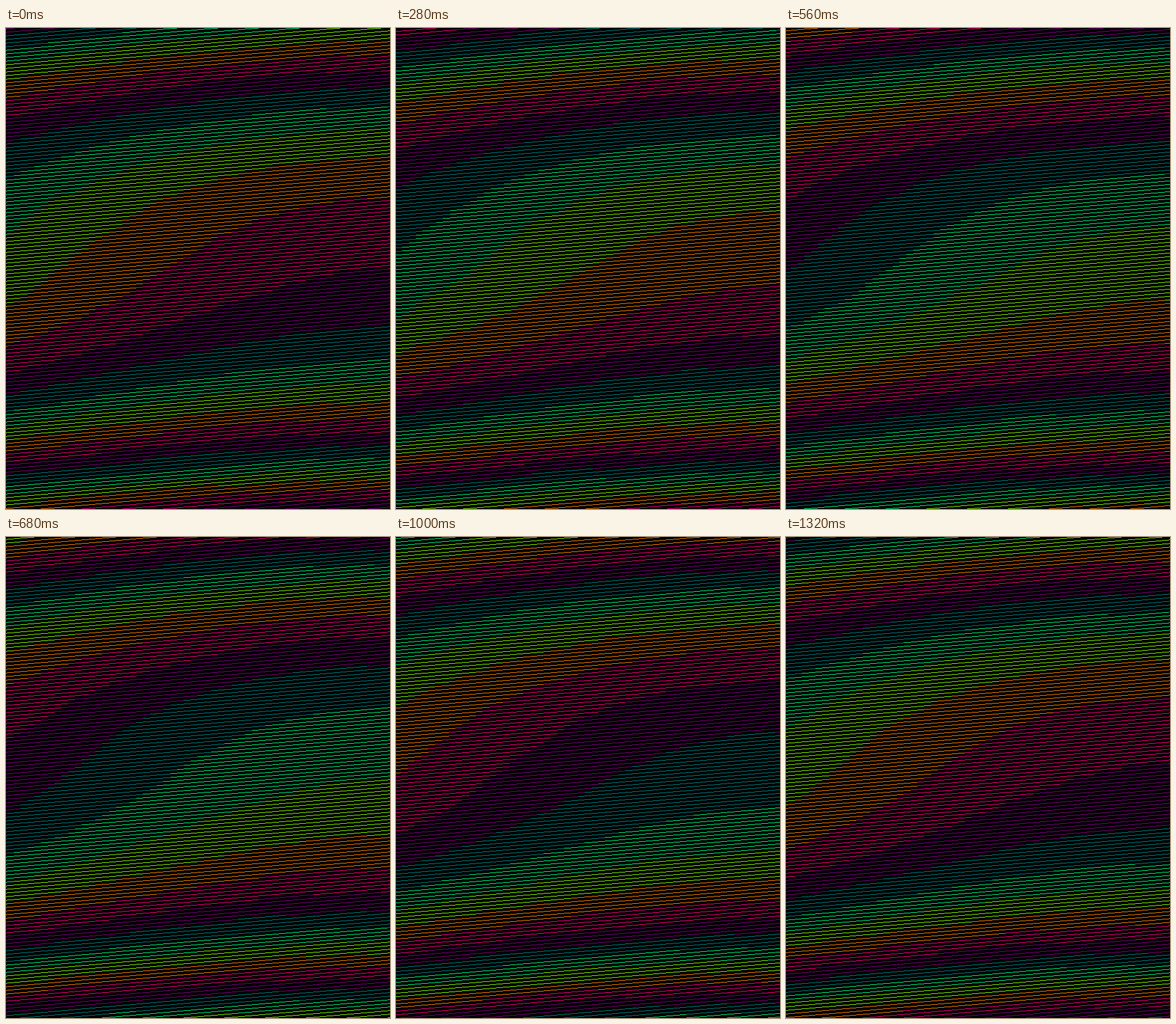
Write an HTML page with a canvas that moves like this. It is 640 by 800 pixels and loops after 1.36 s.

```html
<!DOCTYPE html>
<html lang="en">
<head>
<meta charset="utf-8">
<title>Slanted colour lines</title>
<style>
  html, body { margin: 0; width: 100%; height: 100%; overflow: hidden; background: #000; }
  canvas { display: block; width: 640px; height: 800px; }
</style>
</head>
<body>
<canvas id="stage" width="640" height="800"></canvas>
<script>
const W = 640, H = 800, STEPS = 34, STEP_MS = 40;
const GAP = 6;            // rows between lines
const SPEED = 2;          // pixels to the left per step
const DASH = SPEED * STEPS / GAP;  // a line climbs one row per dash
const ctx = document.getElementById('stage').getContext('2d');
const hues = ['#ff8000', '#ff0080', '#800080', '#008080', '#00ff80', '#80ff00'];

const mod = (a, n) => ((a % n) + n) % n;

// Colour phase in cycles: slow in the middle, fast at the top and bottom
function down(y) {
  const u = y / (H / 2) - 1;
  return 0.82 + 0.52 * u + 0.34 * u ** 2 + 1.73 * u ** 3 - 0.423 * u ** 5;
}

const across = x => 0.43 * Math.sin(Math.PI * x / (2 * W));

function draw(step) {
  ctx.fillStyle = '#000';
  ctx.fillRect(0, 0, W, H);
  const start = 24 + 1 / 3 - SPEED * step;
  const first = Math.floor(-start / DASH);
  const last = Math.ceil((W - start) / DASH);
  for (let k = first; k < last; k++) {
    const x0 = Math.round(start + k * DASH);
    const x1 = Math.round(start + (k + 1) * DASH);
    const shift = across((x0 + x1) / 2) - step / STEPS;
    for (let y = mod(H + 2 - k, GAP); y < H; y += GAP) {
      const cycle = down(y) + shift;
      ctx.fillStyle = hues[mod(Math.round(cycle * hues.length), hues.length)];
      ctx.fillRect(x0, y, x1 - x0, 1);
    }
  }
}

let shown = -1;
function tick() {
  const step = Math.floor(performance.now() / STEP_MS) % STEPS;
  if (step !== shown) draw(shown = step);
  requestAnimationFrame(tick);
}
tick();
</script>
</body>
</html>
```
